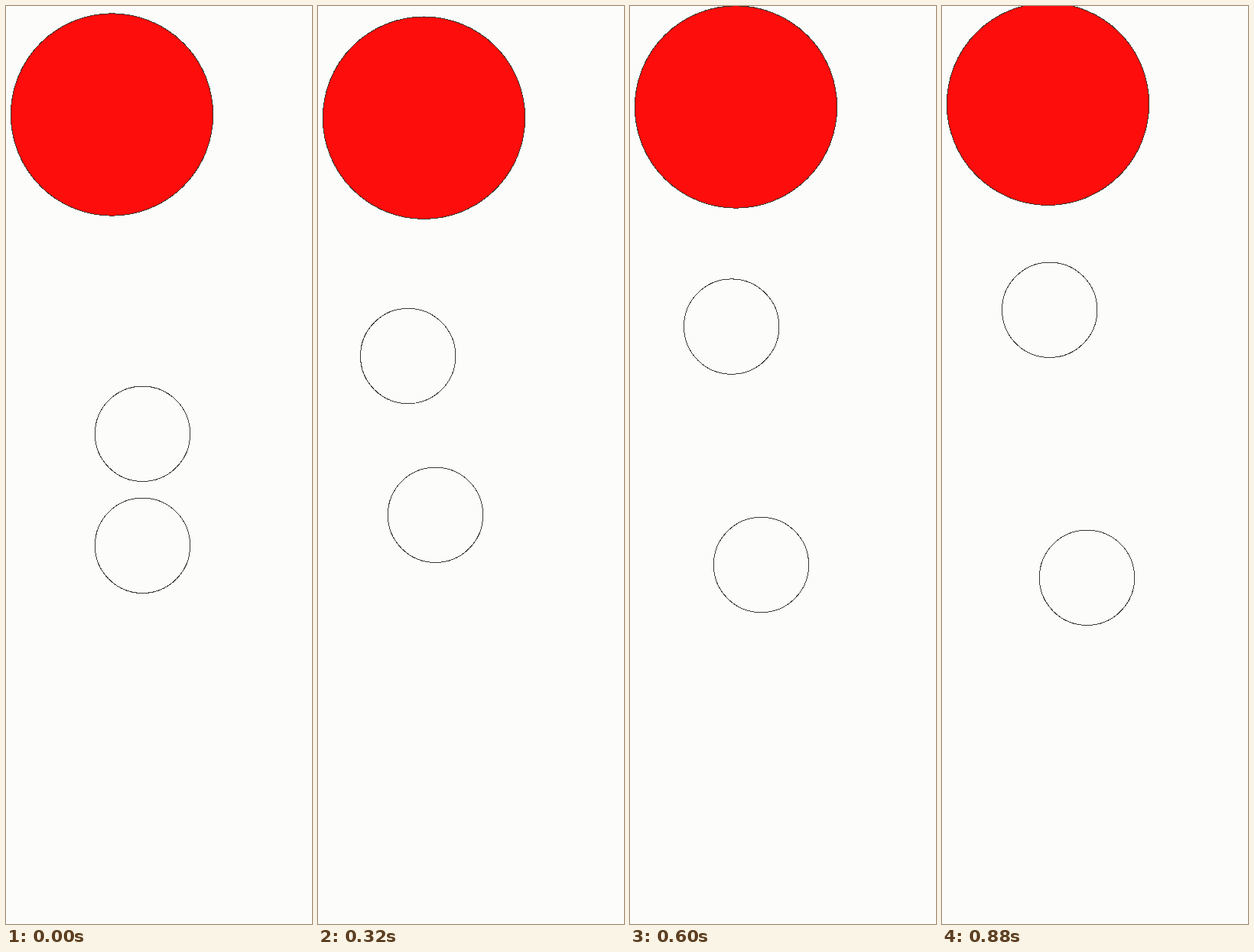
These frames come from a looping animation (400x1200 px, 920 ms). An HTML page:

```html
<!DOCTYPE html>
<html lang="en">
<head>
<meta charset="utf-8">
<title>Three drifting circles</title>
<style>
  html, body { margin: 0; width: 100%; height: 100%; overflow: hidden; background: #fcfcfb; }
  svg { display: block; width: 400px; height: 1200px; }
  circle { fill: none; stroke: #3a3a32; stroke-width: 1; shape-rendering: crispEdges; }
  #ball { fill: #fd0d0b; }
</style>
</head>
<body>
<svg viewBox="0 0 400 1200">
  <circle id="ball" r="132.2"/>
  <circle id="upper" r="62.2"/>
  <circle id="lower" r="62.2"/>
</svg>
<script>
const LOOP = 920, STEP = 40;

const linear = u => u;
const easeIn = u => u ** 3;
const easeOut = u => 1 - (1 - u) ** 2;
const smooth = u => u * u * (3 - 2 * u);

function draw(t) {
  // Part of a distance covered at time t
  const move = (distance, from, to, ease) =>
    distance * ease(Math.min(1, Math.max(0, (t - from) / (to - from))));

  const place = (id, x, y) => {
    const circle = document.getElementById(id);
    circle.setAttribute('cx', x);
    circle.setAttribute('cy', y);
  };

  place('ball', 138.5,
    142 + move(4.2, 0, 320, easeIn) + move(-14.2, 320, 600, easeOut)
      + move(-14.5, 600, 760, linear) + move(10.7, 760, 880, linear));

  place('upper',
    178.5 + move(-60.8, 0, 320, smooth) + move(15, 320, 480, easeOut)
      + move(8, 760, 880, linear),
    559.3 + move(-134, 0, 470, smooth) + move(-28, 520, 880, linear));

  place('lower',
    178.5 + move(-25, 0, 320, easeIn) + move(36, 320, 880, smooth),
    705.3 + move(-40, 0, 320, easeIn) + move(70, 320, 720, easeOut)
      + move(12, 560, 880, linear));
}

const start = performance.now();
function tick() {
  const now = (performance.now() - start) % LOOP;
  draw(Math.floor(now / STEP) * STEP);
  requestAnimationFrame(tick);
}
tick();
</script>
</body>
</html>
```
